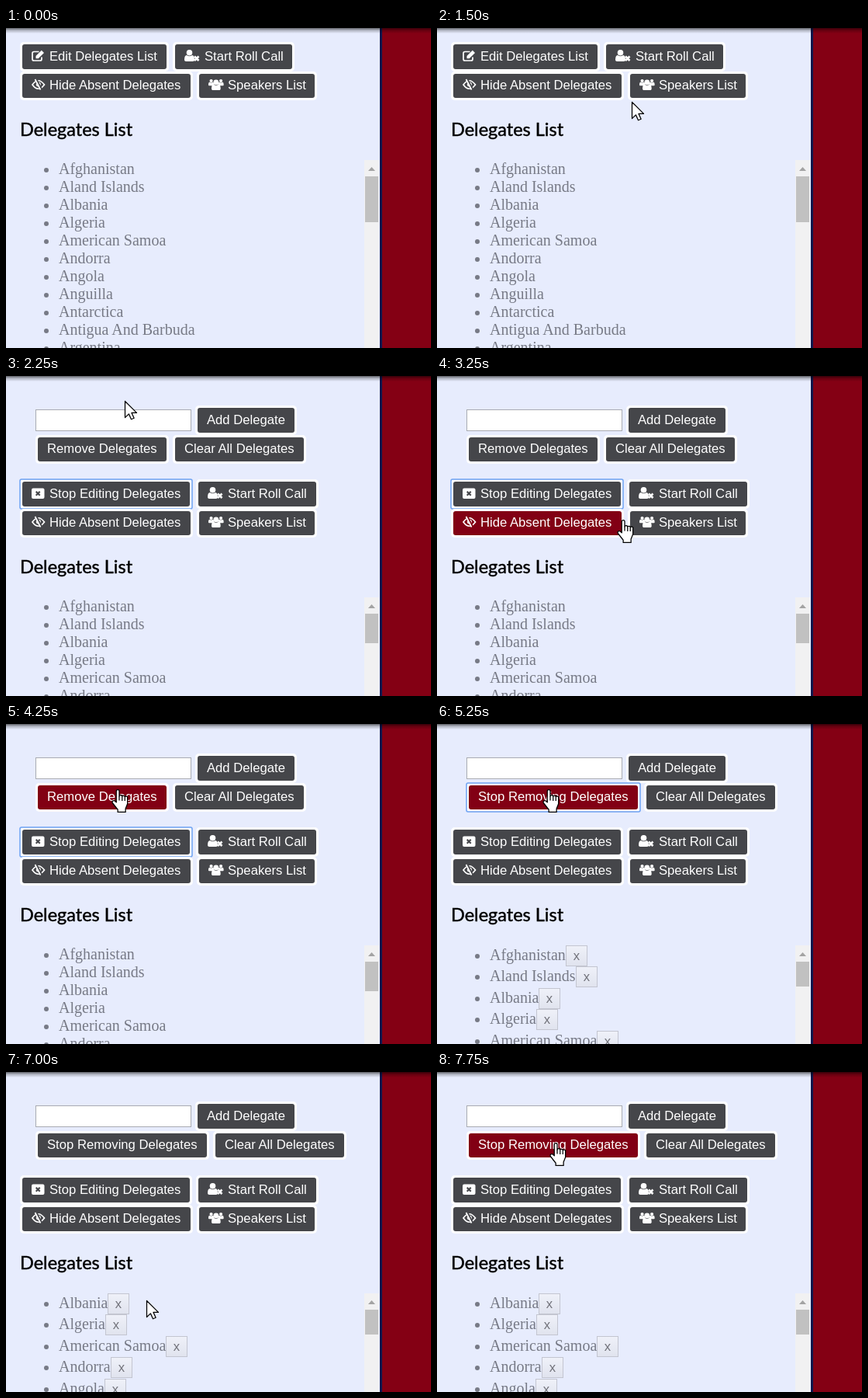
Recreate the animation shown at these times as an HTML page. Size 548x412 px, loop 8 s.

```html
<!DOCTYPE html>
<html lang="en">
<head>
<meta charset="utf-8">
<title>Delegates list</title>
<style>
  html, body { margin: 0; width: 100%; height: 100%; overflow: hidden; background: #e7ecfd; }
  svg { display: block; width: 548px; height: 412px; }
  .label { font: 16.67px "Liberation Sans", Arial, sans-serif; fill: #fff; }
  .title { font: 23.5px Lato, sans-serif; stroke: #000; stroke-width: .45px; }
  .item { font: 20px "Liberation Serif", "Times New Roman", serif; fill: #777a86; }
  .cross { font: 16.67px "Liberation Sans", Arial, sans-serif; fill: #73747c; text-anchor: middle; }
  .line { fill: none; stroke: #fff; stroke-width: 1.7; }
  .ring { fill: none; stroke: #6ea3f3; stroke-width: 1.5; }
  .cursor { fill: #fff; stroke: #000; stroke-width: 1; stroke-linejoin: round; }
</style>
</head>
<body>
<svg viewBox="0 0 548 412">
  <defs>
    <linearGradient id="shade" x2="0" y2="1">
      <stop offset="0" stop-opacity=".6"/>
      <stop offset=".4" stop-opacity=".25"/>
      <stop offset="1" stop-opacity="0"/>
    </linearGradient>
    <linearGradient id="face" x2="0" y2="1">
      <stop offset="0" stop-color="#eff1f9"/>
      <stop offset="1" stop-color="#e0e3ee"/>
    </linearGradient>
  </defs>
  <rect width="548" height="412" fill="#e7ecfd"/>
  <g id="view"></g>
  <rect x="485" width="63" height="412" fill="#840014"/>
  <rect x="482" width="3" height="412" fill="#10164c"/>
  <rect width="548" height="7" fill="url(#shade)"/>
  <g id="pointer"></g>
</svg>
<script>
const LOOP = 8000;
const DARK = '#45464a', RED = '#820014';
const names = ['Afghanistan', 'Aland Islands', 'Albania', 'Algeria', 'American Samoa', 'Andorra',
  'Angola', 'Anguilla', 'Antarctica', 'Antigua And Barbuda', 'Argentina', 'Armenia'];

// time, cursor shape, cursor x, y, highlighted button
const steps = [
  [0],
  [1000, 'arrow', 472, 388],
  [1250, 'arrow', 331, 132],
  [1500, 'arrow', 251, 95],
  [1750, 'hand', 195, 62, 'hide'],
  [2000, 'hand', 146, 31, 'edit'],
  [2250, 'arrow', 153, 32],
  [3000, 'arrow', 209, 93],
  [3250, 'hand', 232, 185, 'hide'],
  [4000, 'hand', 162, 98, 'hide'],
  [4250, 'hand', 136, 84, 'remove'],
  [5500, 'arrow', 207, 264, 'remove'],
  [5750, 'arrow', 200, 296, 'edit'],
  [6000, 'arrow', 181, 294],
  [7250, 'arrow', 162, 224],
  [7500, 'hand', 150, 150, 'hide'],
  [7750, 'hand', 145, 91, 'remove']
];

const cursors = {
  arrow: '<path d="M.4.4v16.8l3.9-3.7 2.5 5.5 2.9-1.2-2.5-5.5h5.2z"/>',
  hand: '<path d="M5 13.5V2a1.5 1.5 0 0 1 3 0v5.5a1.4 1.4 0 0 1 3 .3a1.4 1.4 0 0 1 2.8.5a1.4 1.4 0 0 1 2.7.8V15l-2 5v3.5h-8V21L1 14a1.6 1.6 0 0 1 2.4-2z"/>' +
    '<path d="M8 7.5v4M11 8v4M13.8 8.5v3.5" fill="none"/>'
};

const cross = (x, y, s, color, w) =>
  `<path d="M${x} ${y}l${s} ${s}m0 ${-s}l${-s} ${s}" stroke="${color}" stroke-width="${w}"/>`;
const person = (x, y, k) => `<g transform="translate(${x} ${y}) scale(${k})"><circle cx="6.5" cy="3.8" r="3.8"/>
  <path d="M0 13c0-4 1-6 3-6 2 1.6 5 1.6 7 0 2 0 3 2 3 6 0 1-1 2-2 2H2c-1 0-2-1-2-2z"/></g>`;

const icons = {
  edit: () => `<path class="line" d="M13 9.5V12a2 2 0 0 1-2 2H3a2 2 0 0 1-2-2V4.500a2 2 0 0 1 2-2h6.500"/>
    <path d="M5.500 8l7.300-7.300 3.200 3.200-7.300 7.300H5.500z"/>`,
  close: bg => `<rect y="1.500" width="16.500" height="13.500" rx="2"/>${cross(5.700, 5.700, 5, bg, 2.200)}`,
  roll: () => person(0, 0, 1) + cross(13, 8.500, 5.500, '#fff', 2.600),
  hide: bg => `<path class="line" d="M1 8q7.500-10.500 15.500 0q-8 10.500-15.500 0z"/><circle cx="8.800" cy="7.500" r="3"/>
    <path d="M5.500 1l7 13.500" stroke="${bg}" stroke-width="3.500"/><path class="line" d="M4.500 1l7 13.500"/>`,
  speakers: () => person(0, 1, .55) + person(12.500, 1, .55) + person(4, 1.500, .9)
};

const ring = (x, y, w, h) => `<rect class="ring" x="${x}" y="${y}" width="${w}" height="${h}" rx="2"/>`;

// x and y locate the dark face; the text baseline follows the row
function button(s, id, x, y, w, h, text, icon, indent = 12) {
  const bg = s.hot === id ? RED : DARK;
  const base = y + h - 11;
  return `<rect x="${x - 3}" y="${y - 3}" width="${w + 6}" height="${h + 6}" rx="5" fill="#fff"/>
    <rect x="${x}" y="${y}" width="${w}" height="${h}" rx="3" fill="${bg}"/>
    ${icon ? `<g fill="#fff" transform="translate(${x + 12} ${base - 14})">${icons[icon](bg)}</g>` : ''}
    <text class="label" x="${x + indent}" y="${base}">${text}</text>` +
    (s.focus === id ? ring(x - 3, y - 3, w + 6, h + 6) : '');
}

function editor(s) {
  const [text, w] = s.removing ? ['Stop Removing Delegates', 218] : ['Remove Delegates', 166];
  return '<rect x="38.500" y="43.500" width="200" height="27" fill="#fff" stroke="#a9abb2"/>' +
    button(s, 'add', 247, 41, 125, 32, 'Add Delegate') +
    button(s, 'remove', 41, 79, w, 31, text) +
    button(s, 'clear', 52 + w, 79, 166, 31, 'Clear All Delegates');
}

function toolbar(s, y) {
  const ed = s.editing;
  return button(s, 'edit', 21, y + 21, ed ? 216 : 186, 32,
      ed ? 'Stop Editing Delegates' : 'Edit Delegates List', ed ? 'close' : 'edit', 35) +
    button(s, 'roll', ed ? 248 : 218, y + 21, ed ? 152 : 151, 32, 'Start Roll Call', 'roll', 38) +
    button(s, 'hide', 21, y + 59, 217, 31, 'Hide Absent Delegates', 'hide', 35) +
    button(s, 'speakers', 249, y + 59, 149, 31, 'Speakers List', 'speakers', 37);
}

const pen = document.createElement('canvas').getContext('2d');
pen.font = '20px "Liberation Serif", "Times New Roman", serif';

function list(s, top) {
  return names.slice(s.removed).map((name, i) => {
    const y = top + Math.round(i * (s.removing ? 27.4 : 23));
    const base = y + (s.removing ? 19 : 18);
    let row = `<circle cx="52" cy="${base - 5}" r="3" fill="#777a86"/><text class="item" x="68" y="${base}">${name}</text>`;
    if (s.removing) {
      const x = Math.round(68 + pen.measureText(name).width);
      row += `<rect x="${x + .5}" y="${y + .5}" width="27" height="26" fill="url(#face)" stroke="#c3c5d0"/>
        <text class="cross" x="${x + 14}" y="${base}">x</text>`;
      if (s.focus === 'cross' && !i) row += ring(x + .5, y + .5, 27, 26);
    }
    return row;
  }).join('');
}

function scrollbar(s, y) {
  const thumb = s.removing ? 32 : s.editing ? 38 : 59;
  return `<rect x="462" y="${y}" width="19" height="300" fill="#f1f1f2"/>
    <path d="M467 ${y + 14}h9l-4.500-5z" fill="#a3a3a3"/>
    <rect x="463" y="${y + 21}" width="17" height="${thumb}" fill="#c1c1c1"/>`;
}

function stateAt(t) {
  const index = steps.findLastIndex(step => step[0] <= t);
  const [, shape, x, y, hot] = steps[index];
  return {
    shape, x, y, hot,
    editing: t >= 2250,
    removing: t >= 5250,
    removed: (t >= 6500) + (t >= 7000),
    focus: t < 2250 ? '' : t < 5000 ? 'edit' : t < 6250 ? 'remove' :
      t < 6500 || (t >= 6750 && t < 7000) ? 'cross' : ''
  };
}

const view = document.getElementById('view');
const pointer = document.getElementById('pointer');
let shown = '';

function draw(now) {
  const s = stateAt(now % LOOP);
  const key = JSON.stringify(s);
  if (key !== shown) {
    shown = key;
    const y = s.editing ? 115 : 0;
    view.innerHTML = (s.editing ? editor(s) : '') + toolbar(s, y) +
      `<text class="title" x="18" y="${y + 139}">Delegates List</text>` +
      list(s, y + 170) + scrollbar(s, y + 170);
    pointer.innerHTML = s.shape
      ? `<g class="cursor" transform="translate(${s.x} ${s.y}) scale(1.25)">${cursors[s.shape]}</g>` : '';
  }
}

const start = performance.now();
function tick() {
  draw(performance.now() - start);
  requestAnimationFrame(tick);
}
tick();
</script>
</body>
</html>
```
